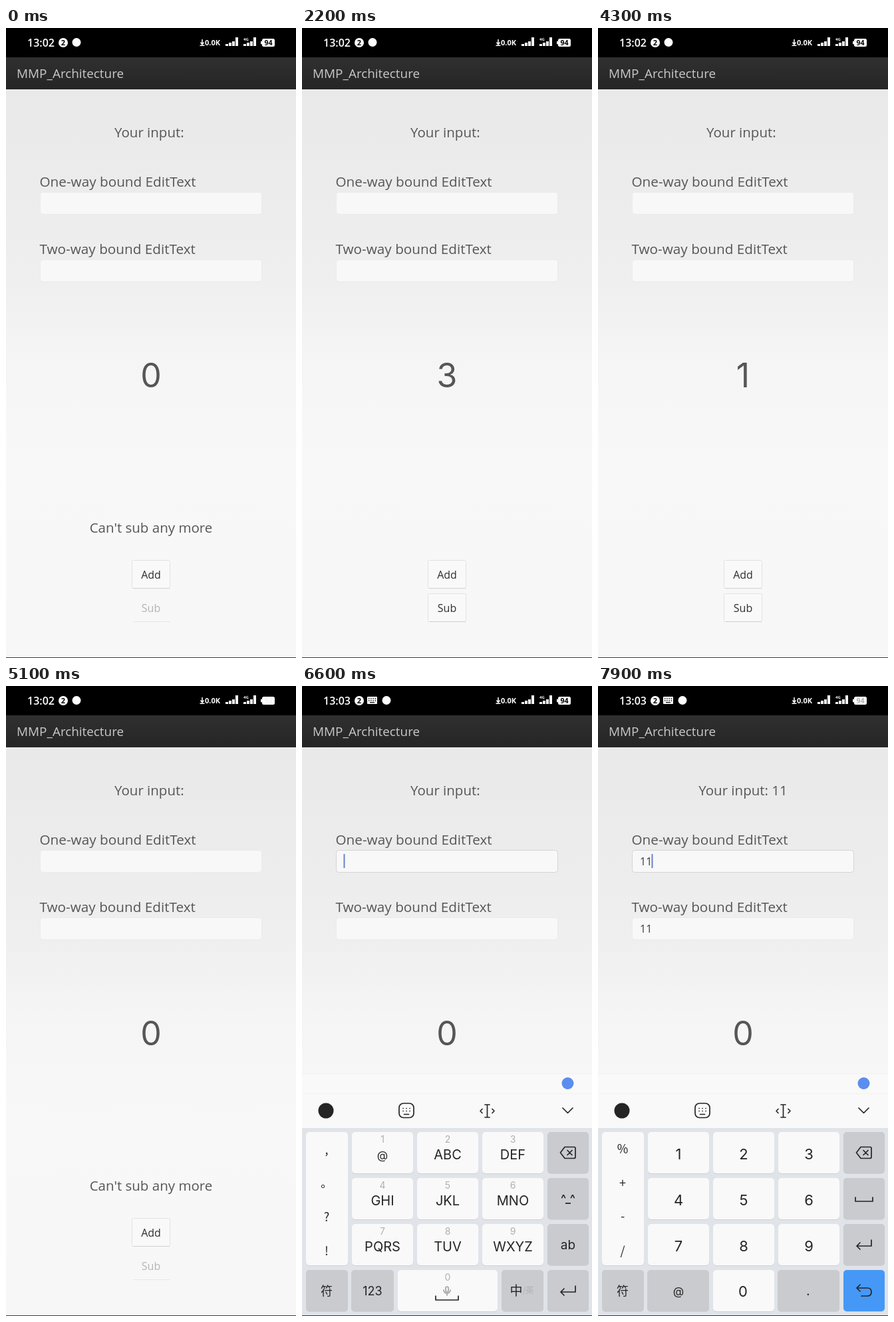
An HTML page for the animation above (8000 ms loop, 436x945 px).

```html
<!DOCTYPE html>
<html lang="en">
<head>
<meta charset="utf-8">
<title>MMP_Architecture</title>
<style>
  html, body { margin: 0; width: 100%; height: 100%; overflow: hidden; background: #f7f7f7; }
  svg { display: block; width: 436px; height: 945px; font: 20.5px "Open Sans", "Noto Sans", sans-serif; fill: #565656; }
  text { white-space: pre; }
  .mid { text-anchor: middle; }
  .bar { fill: #fff; font-weight: 700; }
  .caption { font-size: 20.7px; }
  .field { fill: #f8f8f8; stroke: #ebebeb; }
  .btn { font-size: 16px; fill: #2e2e2e; }
  .btn rect { fill: #f9f9f9; stroke: #e2e2e2; }
  .btn path { stroke: #cfcfcf; }
  .typed { font-size: 16px; fill: #3c3c3c; }
  .keys { fill: #252525; text-anchor: middle; }
  .keys, #count { font-family: Inter, "Open Sans", sans-serif; }
  .keys .icon { fill: none; stroke: #252525; stroke-width: 1.7; stroke-linecap: round; stroke-linejoin: round; }
  .keys .hint { fill: #b0b0b0; }
  .cjk { font-family: "Noto Sans CJK SC", "Noto Sans CJK", sans-serif; }
  .strong { font-weight: 600; }
</style>
</head>
<body>
<svg viewBox="0 0 436 945">
  <defs>
    <linearGradient id="page" x2="0" y2="1">
      <stop stop-color="#e9e9e9"/>
      <stop offset=".34" stop-color="#efefef"/>
      <stop offset=".47" stop-color="#f5f5f5"/>
      <stop offset=".65" stop-color="#f8f8f8"/>
      <stop offset="1" stop-color="#f7f7f7"/>
    </linearGradient>
    <linearGradient id="head" x2="0" y2="1">
      <stop stop-color="#303030"/>
      <stop offset="1" stop-color="#252525"/>
    </linearGradient>
  </defs>

  <rect width="436" height="44" fill="#000"/>
  <rect y="92" width="436" height="853" fill="url(#page)"/>
  <rect y="44" width="436" height="48" fill="url(#head)"/>
  <text x="16" y="75" font-size="18.9" fill="#c9c9c9">MMP_Architecture</text>

  <g class="bar">
    <text id="clock" x="32" y="28" font-size="16" font-weight="600"></text>
    <circle cx="86" cy="22" r="7"/>
    <text class="mid" x="86" y="26" font-size="11" fill="#000">2</text>
    <g id="imeIcon">
      <rect x="98" y="16" width="15" height="11" rx="1"/>
      <path d="M100 19h11M100 22h11" stroke="#000" stroke-width="1.4" stroke-dasharray="1.4 1.8"/>
      <path d="M102 24.7h7" stroke="#000" stroke-width="1.2"/>
    </g>
    <circle id="dot" cy="21.5" r="6.5"/>
    <path d="M295 17v7M292.500 21.500l2.500 3 2.500-3M291.500 26.300h7" fill="none" stroke="#fff" stroke-width="1.5"/>
    <text x="299" y="26" font-size="11">0.0K</text>
    <g id="signal"></g>
    <text x="357" y="19" font-size="6">4G</text>
    <rect x="385" y="16" width="19" height="12" rx="2.500"/>
    <rect x="383" y="19.500" width="2" height="5" rx="1"/>
    <text id="charge" class="mid" x="394.500" y="26" font-size="10.500" fill="#000">94</text>
  </g>

  <text id="echo" class="mid" x="218" y="164"></text>
  <text class="caption" x="50.500" y="238">One-way bound EditText</text>
  <rect id="field1" class="field" x="51.500" y="246.500" width="333" height="33" rx="4"/>
  <text class="caption" x="50.500" y="339">Two-way bound EditText</text>
  <rect class="field" x="51.500" y="347.500" width="333" height="33" rx="4"/>
  <text id="one" class="typed" x="63" y="269"></text>
  <text id="two" class="typed" x="63" y="370"></text>
  <rect id="caret" y="252" width="2" height="21" fill="#6583c8"/>
  <text id="count" class="mid" x="218" y="538.500" font-size="50"></text>
  <text id="limit" class="mid" x="218" y="757">Can't sub any more</text>

  <g class="btn mid">
    <rect x="189.500" y="798.500" width="57" height="42" rx="2"/>
    <path d="M191 840.500h55"/>
    <text x="218" y="826">Add</text>
  </g>
  <g class="btn mid">
    <rect id="subBox" x="189.500" y="848.500" width="57" height="42" rx="2"/>
    <path id="subLine" d="M191 890.500h55"/>
    <text id="subText" x="218" y="876">Sub</text>
  </g>

  <g id="ime" class="keys">
    <rect y="581" width="436" height="83" fill="#f9f9f9"/>
    <path d="M0 581.500h436M0 611.500h436" stroke="#f1f1f1"/>
    <rect y="663" width="436" height="282" fill="#e0e3e8"/>
    <circle cx="399.500" cy="596" r="9" fill="#5b8df0"/>
    <circle cx="36" cy="637" r="11.500"/>
    <g class="icon">
      <rect x="146" y="626" width="22" height="21.500" rx="6.500"/>
      <path d="M152 633.500h.1M157 633.500h.1M162 633.500h.1M152 637.500h.1M157 637.500h.1M162 637.500h.1M153.500 642.500h7"/>
      <path d="M275 628h7M278.500 628v19M275 647h7M271 634.500l-3 3 3 3M286 634.500l3 3-3 3M392 633l7.500 7.500 7.500-7.500"/>
    </g>
    <g id="letters"></g>
    <g id="digits"></g>
  </g>
  <rect y="944" width="436" height="1" fill="#3a3a3a"/>
</svg>
<script>
const $ = id => document.getElementById(id);
const WHITE = '#f9f9fa', GRAY = '#c9cbcf', BLUE = '#4698f6';
const COLS = [75, 173, 271], ROWS = [669, 738, 807, 876];

const key = (x, y, w, fill = WHITE, h = 62) =>
  `<rect x="${x}" y="${y + 1}" width="${w}" height="${h}" rx="5" fill="#cfd2d7"/>` +
  `<rect x="${x}" y="${y}" width="${w}" height="${h}" rx="5" fill="${fill}"/>`;
const label = (s, x, y, size = 20, cls = '') =>
  `<text x="${x}" y="${y}" font-size="${size}" class="${cls}">${s}</text>`;
const icon = (d, x, y) => `<path class="icon" transform="translate(${x} ${y})" d="${d}"/>`;

const ICONS = {
  erase: 'M-5 -8.500H9q2 0 2 2V6.500q0 2 -2 2H-5L-11.500 0ZM-1 -3.500l7 7M6 -3.500l-7 7',
  enter: 'M11 -7V2H-11M-6 -3l-5 5 5 5',
  space: 'M-13 -3V3H13V-3',
  undo: 'M-6 -9l-5 5 5 5M-11 -4H5q6 0 6 6t-6 6H-4',
  mic: 'M-2 -4a2 2 0 0 1 4 0v4a2 2 0 0 1 -4 0ZM-5 -1a5 5 0 0 0 10 0M0 4v3'
};

const grid = draw => [...Array(9).keys()].map(i => {
  const x = COLS[i % 3], y = ROWS[i / 3 | 0];
  return key(x, y, 92) + draw(i, x + 46, y);
}).join('');

// Keys shared by both layouts: punctuation strip, right column, symbols key
const frame = (marks, ys) =>
  key(6, 669, 63, WHITE, 200) +
  marks.map((m, i) => label(m, 37, ys[i], 18, 'cjk')).join('') +
  ROWS.slice(0, 3).map(y => key(369, y, 62, GRAY)).join('') +
  icon(ICONS.erase, 400, 700) +
  key(6, 876, 63, GRAY) + label('符', 37, 914, 18, 'cjk');

const groups = ['@', 'ABC', 'DEF', 'GHI', 'JKL', 'MNO', 'PQRS', 'TUV', 'WXYZ'];
$('letters').innerHTML =
  frame([',', '。', '?', '!'], [702, 752, 803, 854]) +
  grid((i, x, y) => label(i + 1, x, y + 16, 14, 'hint') +
    label(groups[i], x, y + 41, i ? 20 : 17)) +
  label('^_^', 400, 775, 17, 'strong') + label('ab', 400, 845, 19) +
  key(74, 876, 64, GRAY) + label('123', 106, 914, 18) +
  key(144, 876, 150) + label('0', 219, 892, 14, 'hint') +
  `<g opacity=".4">${icon(ICONS.mic, 218, 907)}</g>` + icon('M-17 -3V3H17V-3', 218, 918) +
  key(300, 876, 63, GRAY) + label('中', 322, 914, 19, 'cjk') +
  label('/英', 340, 911, 12, 'cjk hint') +
  key(369, 876, 62, GRAY) + icon(ICONS.enter, 400, 907);

$('digits').innerHTML =
  frame(['%', '+', '-', '/'], [701, 752, 802, 854]) +
  grid((i, x, y) => label(i + 1, x, y + 41, 22)) +
  icon(ICONS.space, 400, 770) + icon(ICONS.enter, 400, 838) +
  key(74, 876, 93, GRAY) + label('@', 121, 914, 17) +
  key(173, 876, 92) + label('0', 218, 916, 22) +
  key(270, 876, 93, GRAY) + label('.', 316, 914) +
  key(369, 876, 62, BLUE) + icon(ICONS.undo, 400, 907);

$('signal').innerHTML = [330, 357].map(x =>
  [3, 5, 7, 13].map((h, i) =>
    `<rect x="${x + i * 5}" y="${27 - h}" width="4" height="${h}"/>`).join('')).join('');

// Last value whose start time has passed
const at = (t, ...steps) => steps.reduce((v, [start, next]) => t >= start ? next : v, steps[0][1]);
const clamp = v => Math.max(0, Math.min(1, v));
const show = (id, on) => $(id).setAttribute('visibility', on ? 'visible' : 'hidden');
const set = (id, name, v) => $(id).setAttribute(name, v);

function render(t) {
  const n = at(t, [0, 0], [900, 1], [1300, 2], [2000, 3], [3500, 2], [3900, 1], [4700, 0]);
  const typed = at(t, [0, ''], [7500, '1'], [7800, '11']);
  const focused = t >= 6300, ime = t >= 6500, numeric = t >= 7100;

  $('clock').textContent = t < 5600 ? '13:02' : '13:03';
  $('count').textContent = n;
  $('echo').textContent = 'Your input:\u00a0' + typed;
  $('one').textContent = $('two').textContent = typed;

  // The charge label fades out and in every 2.3 s
  const away = Math.abs((t + 450) % 2300 - 1150);
  set('charge', 'opacity', clamp((away - 180) / 400));

  show('limit', n === 0);
  show('subBox', n > 0);
  set('subLine', 'opacity', n ? 1 : .4);
  set('subText', 'fill', n ? '#2e2e2e' : '#b4b4b4');

  set('field1', 'style', focused ? 'stroke:#d4d4d4' : '');
  set('caret', 'x', 62.5 + typed.length * 9);
  show('caret', focused && !(t >= 6800 && t < 7300));

  show('imeIcon', ime);
  set('dot', 'cx', ime ? 127 : 106);
  show('ime', t > 6400);
  set('ime', 'transform', `translate(0 ${364 * (1 - clamp((t - 6400) / 190)) ** 2})`);
  set('letters', 'display', numeric ? 'none' : 'inline');
  set('digits', 'display', numeric ? 'inline' : 'none');
}

const begin = performance.now();
function tick() {
  render((performance.now() - begin) % 8000);
  requestAnimationFrame(tick);
}
tick();
</script>
</body>
</html>
```
